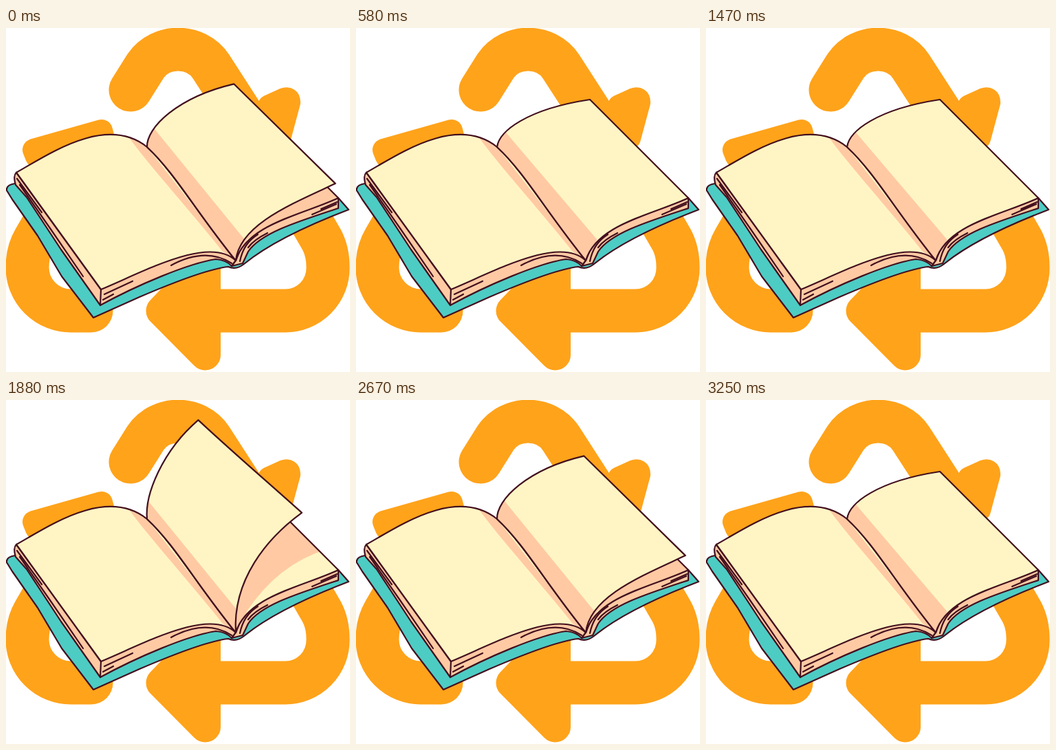
Recreate the animation shown at these times as an HTML page. Size 500x500 px, loop 3530 ms.

```html
<!DOCTYPE html>
<html lang="en">
<head>
<meta charset="utf-8">
<title>Turning pages</title>
<style>
  html, body { margin: 0; height: 100%; overflow: hidden; background: #fff; }
  svg { display: block; width: 100vw; height: 100vh; }
  .band { fill: none; stroke: #ffa31a; stroke-width: 63; stroke-linecap: round; stroke-linejoin: round; }
  .head { fill: #ffa31a; stroke: #ffa31a; stroke-width: 32; stroke-linejoin: round; }
  .wide { stroke-width: 45; }
  .ink { fill: none; stroke: #43101f; stroke-width: 2.2; stroke-linejoin: round; stroke-linecap: round; }
  .teal { fill: #4dccc4; }
  .peach { fill: #ffcaa3; }
  .cream { fill: #fff5c4; }
</style>
</head>
<body>
<svg viewBox="0 0 500 500">
  <defs>
    <path id="left" d="M205 173C145 125 60 185 15 210L138 380C205 352 295 302 334 338C275 265 245 210 205 173Z"/>
    <path id="right" d="M205 173C208 150 248 118 340 104L483 247C430 272 350 285 334 338C275 265 245 210 205 173Z"/>
    <path id="page"/>
    <clipPath id="inLeft"><use href="#left"/></clipPath>
    <clipPath id="inRight"><use href="#right"/></clipPath>
    <clipPath id="inPage"><use href="#page"/></clipPath>
  </defs>

  <!-- recycling arrows -->
  <path class="band" d="M181 90L203 55C225 23 276 23 298 56L360 152"/>
  <path class="head" d="M382 113L404 103Q412 100 412 108L398 160L370 140Z"/>
  <path class="head" d="M40 177L139 149L150 190L44 187Z"/>
  <path class="band" d="M70 258L41 308Q31 325 31 348A63 63 0 0 0 94 411H124"/>
  <path class="band" d="M430 258L459 308Q468 325 468 348A62 62 0 0 1 406 411H300"/>
  <path class="head wide" d="M226 411L289.5 475V345Z"/>

  <!-- cover and page blocks; their inner corners lie hidden under the pages -->
  <path class="ink teal" d="M13 226Q0 228 1 236L9 249L46 302L81 361L127 421L194 391C250 367 295 350 323 347Q335 352 346 343C380 315 430 290 498 264L483 247L334 300Z"/>
  <path class="ink peach" d="M15 210Q10 215 14 228L30 246L80 322L137 403C190 374 265 342 305 336Q320 337 328 346L334 338L250 260L138 380Z"/>
  <path class="ink peach" d="M483 247V262C425 281 370 298 352 325L344 342L328 346L334 338L380 220Z"/>
  <path class="ink" d="M16 219L52 268M20 228L64 291L112 361M138 380L137 403M143 387L184 368M141 395L156 387M240 345Q290 318 328 342M366 300Q345 313 340 339M380 298Q360 308 352 319M445 271L480 256M458 263L481 253"/>

  <!-- resting pages -->
  <use href="#left" class="cream"/>
  <path class="peach" clip-path="url(#inLeft)" d="M205 173L180 150V161C215 208 270 268 315 325L334 338Z"/>
  <path class="peach" clip-path="url(#inLeft)" id="leftShade"/>
  <use href="#left" class="ink"/>
  <use href="#right" class="cream"/>
  <path class="peach" clip-path="url(#inRight)" id="rightShade"/>
  <use href="#right" class="ink"/>

  <!-- turning page -->
  <use href="#page" class="cream"/>
  <path class="peach" clip-path="url(#inPage)" id="stripe"/>
  <use href="#page" class="ink"/>
</svg>
<script>
const LOOP = 3530, TURN = 890, STEP = 48, LAST = 12;
const HEAD = [205, 173], FOOT = [334, 338];   // ends of the spine

const draw = (id, d) => document.getElementById(id).setAttribute('d', d);
const mix = (a, b, k) => a.map((v, i) => v + (b[i] - v) * k);
const polar = ([x, y], deg, r) => {
  const a = deg * Math.PI / 180;
  return [x + r * Math.cos(a), y + r * Math.sin(a)];
};

// Curve from a to b; each control is given along and across the chord
function edge(a, b, ...controls) {
  const dx = b[0] - a[0], dy = b[1] - a[1];
  const pts = controls.map(([u, v]) => [a[0] + dx * u - dy * v, a[1] + dy * u + dx * v]);
  return `C${pts.join(' ')} ${b}`;
}

// u runs from 0 (just lifted on the right) to 1 (flat on the left)
function render(u) {
  const swing = u + 1.35 * u ** 3 * (1 - u);
  const lift = Math.sin(Math.PI * u), root = Math.sqrt(swing);
  const curl = -0.21 * Math.tanh(8 * (u - 0.45));   // changes side as the page passes upright

  // the lower corner lags a little behind the upper one
  const top = polar(HEAD, -36 - 155 * swing, 156 + 36 * u);
  const low = polar(FOOT, -37.7 - 153.8 * swing + 6 * lift, 183 + 17 * u + 26 * lift);

  draw('page', u === 1 ? '' : `M${HEAD}`
    + edge(HEAD, top, [0.1 + 0.2 * root, -0.15 + 0.45 * swing ** 1.5], [0.5 + 0.25 * root, -0.21 + 0.29 * swing])
    + edge(top, low, [0.3, 0.04 * swing], [0.65, 0])
    + edge(low, FOOT, [0.36 - 0.14 * lift, 0.08 - 0.146 * u + 0.16 * lift], [0.8 - 0.25 * lift, curl])
    + 'C275 265 245 210 205 173Z');

  // fold shading beside the spine: narrows on the front, then on the back
  const width = u < 0.5 ? 0.16 - 0.24 * u : 0.06 + 0.55 * (1 - u);
  const p = mix(HEAD, top, width), q = mix(FOOT, low, width);
  draw('stripe', `M${HEAD}L${mix(p, q, -0.3)}L${mix(p, q, 1.3)}L${FOOT}Z`);

  // shadow on the right page shrinks to its fold
  const w = Math.min(1, 2 * u), bow = Math.sin(Math.PI * w);
  const r = mix([483, 247], [218, 152], w ** 2.4);
  r[1] -= 26 * bow;
  const c = mix(r, [350, 307], 0.5);
  c[0] -= 13 * bow;
  c[1] -= 27 * bow;
  const far = mix(c, r, 1.8);
  draw('rightShade', `M${FOOT}L${HEAD}L${far[0]} 60L${far}L${r}Q${c} 350 307V340Z`);

  // shadow on the left page runs below the falling edge
  draw('leftShade', u < 0.5 || u === 1 ? '' :
    `M${FOOT}L${HEAD}L${low}l20 20Q${low[0] + 65} ${low[1] + 87} 290 328Z`);
}

let shown = -1;
function tick(now) {
  const t = now % LOOP % TURN;
  const step = Math.min(LAST, Math.floor((t + 4) / STEP));
  if (step !== shown) render((shown = step) / LAST);
  requestAnimationFrame(tick);
}
tick(0);
</script>
</body>
</html>
```
